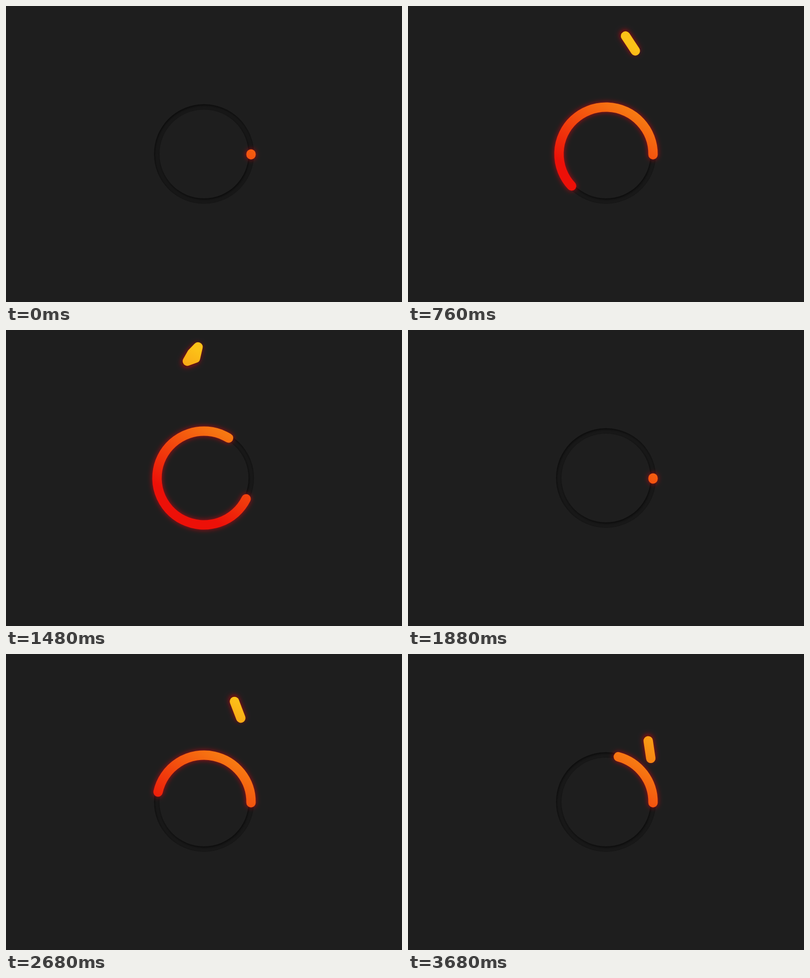
An HTML page with a canvas that plays this animation: 800 px wide and 600 px high, repeating every 3.72 s.

```html
<!DOCTYPE html>
<html lang="en">
<head>
<meta charset="utf-8">
<title>Fiery loader</title>
<style>
  html, body { margin: 0; height: 100%; overflow: hidden; background: #1e1e1e; }
  canvas { display: block; }
</style>
</head>
<body>
<canvas id="stage" width="800" height="600"></canvas>
<script>
const ctx = document.getElementById('stage').getContext('2d');
const LOOP = 3720, STEP = 40, CYCLE = 2800 / 3;
const CX = 400, CY = 300, R = 95, TAU = Math.PI * 2;
const clamp = (v, lo = 0, hi = 1) => Math.min(hi, Math.max(lo, v));

const fire = ctx.createLinearGradient(367, 353, 513, 119);
fire.addColorStop(0, '#ed1008');
fire.addColorStop(0.4, '#f4570f');
fire.addColorStop(1, '#fcc218');

function glow(on) {
  ctx.shadowColor = on ? 'rgba(255, 0, 15, 0.65)' : 'transparent';
  ctx.shadowBlur = on ? 11 : 0;
}

// Engraved groove: flat ring with an inner shadow.
function drawTrack() {
  const ring = new Path2D();
  ring.arc(CX, CY, 101, 0, TAU);
  ring.closePath();
  ring.moveTo(CX + 90, CY);
  ring.arc(CX, CY, 90, 0, TAU);
  const outside = new Path2D(ring);
  outside.rect(0, 0, 800, 600);

  ctx.save();
  ctx.clip(ring, 'evenodd');
  ctx.fillStyle = '#181818';
  ctx.fillRect(0, 0, 800, 600);
  ctx.shadowColor = 'rgba(0, 0, 0, 0.6)';
  ctx.shadowBlur = 4;
  ctx.shadowOffsetX = 1;
  ctx.shadowOffsetY = 2;
  ctx.fillStyle = '#1e1e1e';
  ctx.fill(outside, 'evenodd');
  ctx.restore();
}

function drawArc(p) {
  const head = (1 - Math.cos(Math.PI * clamp(p / 745))) / 2;
  const tail = clamp(p / 922) ** 5;
  glow(true);
  ctx.strokeStyle = fire;
  ctx.beginPath();
  ctx.arc(CX, CY, R, tail * TAU, Math.max(head, tail) * TAU + 0.015);
  ctx.stroke();
  glow(false);
}

// Progress of the drop along its arch, slowest at the top.
function flight(p) {
  const d = p - 615;
  const t = 0.5 + 0.001165 * d + 4.02e-9 * d ** 3;
  return clamp(t * Math.sin(Math.PI / 2 * clamp((p - 340) / 100)));
}

// Elongated drop that bulges sideways shortly after take-off.
function dropPath(p, t, lag) {
  const x = CX - R + 2 * R * t * t * (3 - 2 * t);
  const y = CY - 1032 * t * (1 - t);
  const angle = Math.atan2(-1032 * (1 - 2 * t), 1140 * t * (1 - t));
  const bulge = clamp(1 - ((p - 440) / 160) ** 2);
  const back = -Math.min(18, t * 1032), front = Math.min(18, (1 - t) * 1032);

  ctx.save();
  ctx.translate(x, y);
  ctx.rotate(angle - 0.7 * bulge);
  ctx.translate(-lag, 0);
  ctx.beginPath();
  ctx.moveTo(back, 0);
  ctx.lineTo(0, -4 * bulge);
  ctx.lineTo(front, 0);
  ctx.lineTo(-6 * bulge, 17 * bulge);
  ctx.closePath();
  ctx.restore();
}

function drawDrop(p) {
  const t = flight(p);
  if (t <= 0) return;
  glow(true);
  dropPath(p, t, 3);
  ctx.strokeStyle = '#5c1210';
  ctx.stroke();
  glow(false);
  dropPath(p, t, 0);
  ctx.strokeStyle = ctx.fillStyle = fire;
  ctx.fill();
  ctx.stroke();
}

function draw(now) {
  const time = Math.floor(now % LOOP / STEP) * STEP;
  const phase = time % CYCLE;
  ctx.fillStyle = '#1e1e1e';
  ctx.fillRect(0, 0, 800, 600);
  ctx.lineWidth = 19;
  ctx.lineCap = ctx.lineJoin = 'round';
  drawTrack();
  drawArc(phase);
  drawDrop(phase);
  requestAnimationFrame(draw);
}
requestAnimationFrame(draw);
</script>
</body>
</html>
```
